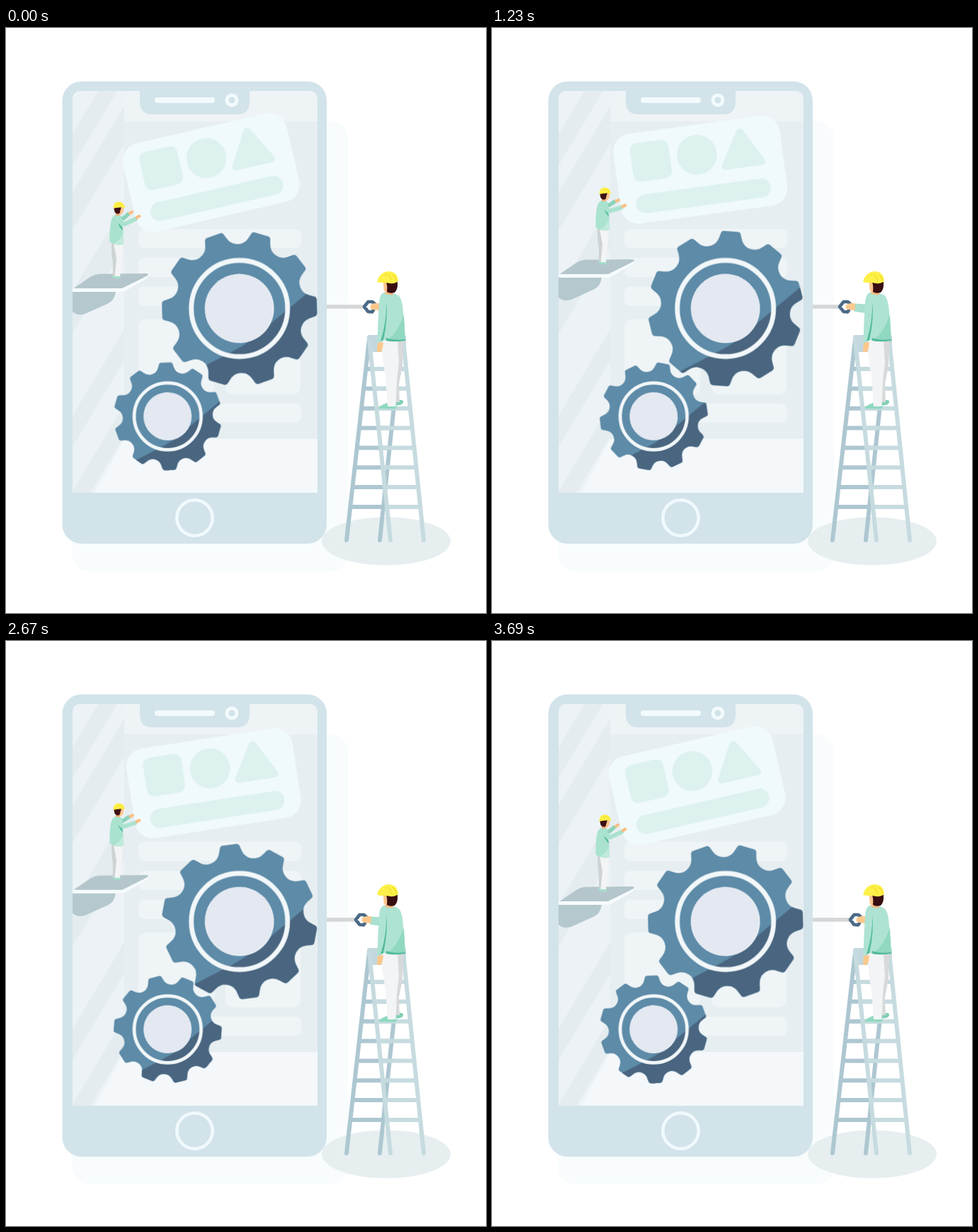
Recreate the animation shown at these times as an HTML page. Size 678x827 px, loop 3720 ms.

```html
<!DOCTYPE html>
<html lang="en">
<head>
<meta charset="utf-8">
<title>App maintenance</title>
<style>
  html, body { margin: 0; width: 100%; height: 100%; overflow: hidden; background: #fff; }
  svg { display: block; width: 678px; height: 827px; }
</style>
</head>
<body>
<svg viewBox="0 0 678 827" xmlns="http://www.w3.org/2000/svg">
  <defs>
    <clipPath id="shade"><path d="M130-50 48 18Q20 46-12 62L-95 105V130H130Z"/></clipPath>
    <clipPath id="screen"><path d="M94 657V102Q94 89 107 89H427Q440 89 440 102V657Z"/></clipPath>
    <clipPath id="wall"><path d="M94 89H167V581L125 657H94Z"/></clipPath>
  </defs>

  <rect x="93" y="132" width="390" height="636" rx="24" fill="#f8fcfd"/>
  <ellipse cx="537" cy="725.5" rx="91" ry="34" fill="#e6eef0"/>

  <g id="tool">
    <path d="M440 394H506" stroke="#d4d6d7" stroke-width="5.5"/>
    <path d="M521 390 517.500 387 511.500 387 506 394 511.500 401 517 401.500 519 399" fill="none" stroke="#4a6a86" stroke-width="4.6" stroke-linejoin="round" stroke-linecap="round"/>
    <path d="M526 389.500 554 391V405L526 400.500Z" fill="#a8e0cf"/>
    <path d="M515 392Q518 388 528 389.500L527.500 399Q521 398.500 517 398Q513.500 396 515 392Z" fill="#fbc88c"/>
  </g>

  <!-- phone -->
  <rect x="79.500" y="75.500" width="373.500" height="653.500" rx="27" fill="#d2e3ea"/>
  <g clip-path="url(#screen)">
    <path d="M94 89H440V657H94Z" fill="#e7eef1"/>
    <path d="M94 89H440V132H94Z" fill="#eef3f5"/>
    <path d="M167 581H440V657H125Z" fill="#f4f8fb"/>
    <g clip-path="url(#wall)">
      <path d="M94 89H167V657H94Z" fill="#ecf2f5"/>
      <g id="stripes" fill="#e4ecef"></g>
    </g>
  </g>
  <path d="M189 88H344V104Q344 122 326 122H207Q189 122 189 104Z" fill="#d2e3ea"/>
  <rect x="210" y="98" width="85" height="8" rx="4" fill="#f2fafc"/>
  <circle cx="319" cy="102" r="7" fill="none" stroke="#f2fafc" stroke-width="5"/>
  <circle cx="266.500" cy="692.500" r="25.200" fill="none" stroke="#f0f9fc" stroke-width="4.600"/>

  <g fill="#eff4f6">
    <rect x="187" y="284" width="230" height="27" rx="8"/>
    <rect x="187" y="325" width="230" height="27" rx="8"/>
    <rect x="187" y="365.500" width="230" height="27.500" rx="8"/>
    <rect x="187" y="412" width="107" height="106" rx="10"/>
    <rect x="310" y="412" width="106" height="106" rx="10"/>
    <rect x="187" y="531" width="230" height="27" rx="8"/>
  </g>

  <g transform="translate(337 251)">
    <g id="card" fill="#ddf1ef">
      <rect x="-154" y="-120" width="237" height="128" rx="25" fill="#f0fafc"/>
      <rect x="-130.500" y="-105.500" width="55" height="55" rx="10"/>
      <circle cx="-37.500" cy="-77.500" r="28.300"/>
      <path d="M27-101.500 52-56H0Z" stroke="#ddf1ef" stroke-width="10" stroke-linejoin="round"/>
      <rect x="-132" y="-32.300" width="192" height="27" rx="13.500"/>
    </g>
  </g>

  <!-- lift with worker -->
  <g id="lift">
    <path d="M94 373H155Q153 386 143 390L113 403.500Q102 408 94 401Z" fill="#b4c8ce"/>
    <path d="M94 369 119 352Q125 348 131 347.700L198 347Q202 347 200 350L165 369Z" fill="#b4c6cb"/>
    <path d="M94 368H164L200.500 350V353L167 372.500Q166 373 164 373H94Z" fill="#f6fbfc"/>
    <path d="M150 350Q155 347 162 350Q163 355 157 354.500Q150 354 150 350Z" fill="#a5decb"/>
    <path d="M149 304H158L157 328 155.500 350H150.500Q152 332 149.500 322Z" fill="#cdd2d4"/>
    <path d="M152 304H165.500L163.500 328 161 351H153.500L156 326Z" fill="#f3f4f5"/>
    <g transform="translate(157 268)">
      <path class="arm" d="M3 3 9 1 17-6" fill="none" stroke="#8bd3bb" stroke-width="5.500"/>
      <path class="arm" d="M18-6 21-8" stroke="#f9bd82" stroke-width="4" stroke-linecap="round"/>
    </g>
    <path d="M153 265Q158 262 163 266Q166 276 165.500 306Q155 308 146.500 302Q146 280 149 271Q150 267 153 265Z" fill="#a9e2cf"/>
    <path d="M158 276Q165 280 165 286Q162 285 158 276Z" fill="#58bd9f"/>
    <path d="M165.500 290 165.500 306 152 305Q161 301 165.500 290Z" fill="#c2ebdd"/>
    <g transform="translate(157 268)">
      <path class="arm" d="M1 4 10 9.500 28 1" fill="none" stroke="#a9e2cf" stroke-width="6" stroke-linejoin="round"/>
      <path class="arm" d="M28 0 31-2" stroke="#f9bd82" stroke-width="4.500" stroke-linecap="round"/>
    </g>
    <path d="M155 258H161V265H155Z" fill="#f4b077"/>
    <path d="M157 253H166Q167 261 162 264Q158 263 157 259Z" fill="#fbc38c"/>
    <path d="M152 253H163Q162 256 160.500 262Q156 264 153.500 260Z" fill="#3d1014"/>
    <path d="M151.500 255Q151 246 159 245.500Q166 246 167 251L169 254Q161 252.500 151.500 255Z" fill="#fdf048"/>
    <path d="M157 249Q162 247 166 251" fill="none" stroke="#f4de30"/>
  </g>

  <g id="gears"></g>

  <!-- ladder -->
  <rect x="510" y="434" width="55" height="24" rx="3" fill="#c3d8de"/>
  <g id="ladder" fill="none" stroke-width="6" stroke-linecap="round"></g>

  <!-- ladder worker -->
  <path d="M550 528Q557 524 561 527Q562 533 552 533.500Z" fill="#7fcfb3"/>
  <path d="M546 440H561.500L560 478 555 504 556 529H549Z" fill="#d8d9db"/>
  <path d="M526 538Q527 534 538 530H551Q553 536 550 538.500Z" fill="#8fd8c0"/>
  <path d="M530 440H553L555 474Q553 488 552 500L550.500 535H539L536 492Q531 468 530 440Z" fill="#f3f4f5"/>
  <path d="M525 445Q524 455 524 457Q530 461 532 452L533 444Z" fill="#fbc88c"/>
  <path d="M533 374Q544 372 554 378Q560 382 561 403L564 441Q545 444 533 441L524.500 445Q525 418 527 390Q527 378 533 374Z" fill="#aee3d3"/>
  <path d="M562 405 564 441 537 441.500Q552 434 562 405Z" fill="#91d8c1"/>
  <path d="M537 387Q540 410 533 441.500L529 443Q538 415 537 387Z" fill="#54bb9c"/>
  <path d="M537 438Q548 442 564 440V442Q547 444.500 537 442Z" fill="#54bb9c"/>
  <path d="M537 367H547V377Q540 378 535 375Z" fill="#f6b981"/>
  <path d="M533 360H544V374Q535 375 533.500 370Z" fill="#fbc58d"/>
  <path d="M537 359H553Q554 369 549 374Q542 376 538 373Q539 365 537 359Z" fill="#380d11"/>
  <path d="M524 358.500Q528 345 540 344Q553 344 554 358Q548 363 537 360Q528 361 524 358.500Z" fill="#fdf048"/>
  <path d="M535 349Q543 347 544 357M546 348Q551 351 551 358" fill="none" stroke="#f4de30" stroke-width="1.300"/>
</svg>
<script>
  const $ = id => document.getElementById(id);
  const TEETH = 10, HALF = 1860;

  // Diagonal reflections on the side wall: y at the left edge, and height
  const slope = 122;
  $('stripes').innerHTML = [[150, 44], [232, 54], [372, 60], [548, 44], [655, 44]].map(([y, h]) =>
    `<path d="M94 ${y}L167 ${y - slope}v${h}L94 ${y + h}Z"/>`).join('');

  // Ladder: each side is two rails, given by their x at the head and foot
  const headY = 440, footY = 724;
  const railX = ([a, b], y) => a + (b - a) * (y - headY) / (footY - headY);
  const side = (left, right, color) => {
    let d = '';
    for (const [a, b] of [left, right]) d += `M${a} ${headY}L${b} ${footY}`;
    for (let i = 0; i < 8; i++) {
      const y = 482 + i * 27.85;
      d += `M${railX(left, y)} ${y}H${railX(right, y)}`;
    }
    return `<path stroke="${color}" d="${d}"/>`;
  };
  $('ladder').innerHTML =
    side([513, 481], [558, 528], '#adc7d1') + side([513, 543], [561, 590], '#c6dbdf');

  // Gear outline: one tooth repeated around the circle
  const tooth = [[-28.1, -86.6], [-18.5, -89.7], [-15.8, -100], [-14, -106], [-13.2, -109], [-10, -109.3],
    [10, -109.3], [13.2, -109], [14, -106], [15.8, -100], [18.5, -89.7], [28.1, -86.6]];
  const outline = () => {
    let d = '';
    for (let i = 0; i < TEETH; i++) {
      const a = i * 2 * Math.PI / TEETH, c = Math.cos(a), s = Math.sin(a);
      const p = tooth.map(([x, y]) => `${(x * c - y * s).toFixed(2)} ${(x * s + y * c).toFixed(2)}`);
      d += `${i ? 'L' : 'M'}${p[0]}Q${p[1]} ${p[2]}L${p[3]}Q${p[4]} ${p[5]}L${p[6]}Q${p[7]} ${p[8]}L${p[9]}Q${p[10]} ${p[11]}`;
    }
    return d + 'Z';
  };
  const shape = outline();
  const gear = (x, y, k, cls) => `
    <g transform="translate(${x} ${y}) scale(${k})">
      <path class="${cls}" d="${shape}" fill="#5d8ba8"/>
      <g clip-path="url(#shade)"><path class="${cls}" d="${shape}" fill="#49657f"/></g>
      <circle r="68" fill="none" stroke="#f2f7f9" stroke-width="6.8"/>
      <g class="${cls}">
        <circle r="48.8" fill="#f1f5f8"/>
        <circle cx="-.5" cy="-.3" r="48.2" fill="#e3e8f1"/>
      </g>
    </g>`;
  $('gears').innerHTML = gear(329.7, 396.5, 1, 'big') + gear(228.3, 548.9, .695, 'small');

  // Every part swings between two poses with the same easing
  const swing = (el, from, to) => el.animate([{ transform: from }, { transform: to }], {
    duration: HALF, iterations: Infinity, direction: 'alternate', easing: 'cubic-bezier(.37,0,.63,1)'
  });
  const turn = (el, a, b) => swing(el, `rotate(${a}deg)`, `rotate(${b}deg)`);
  const all = (sel, fn) => document.querySelectorAll(sel).forEach(fn);

  swing($('lift'), 'translate(0px, 0px)', 'translate(0px, -27px)');
  swing($('tool'), 'translate(0px, 0px)', 'translate(-20px, 0px)');
  turn($('card'), -13, -6);
  all('.arm', el => turn(el, 0, 12));
  all('.big', el => turn(el, -19.5, 60.5));
  all('.small', el => turn(el, -2, -82));
</script>
</body>
</html>
```
